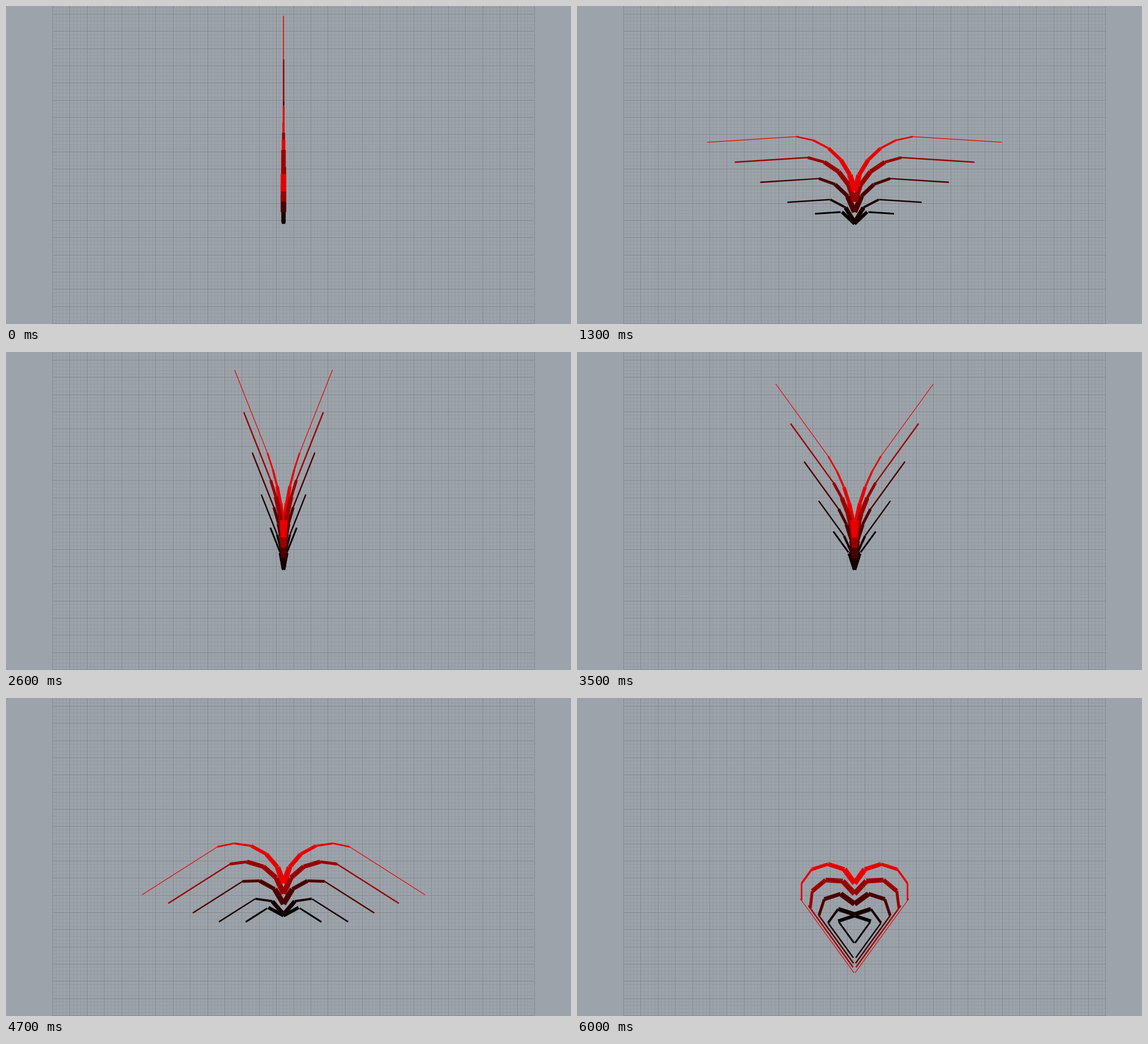
An HTML page with a canvas that plays this animation: 998 by 561 pixels, repeating every 6.1 s.

```html
<!DOCTYPE html>
<html lang="en">
<head>
<meta charset="utf-8">
<title>Unfolding heart</title>
<style>
  html, body { margin: 0; width: 100%; height: 100%; overflow: hidden; background: #9da3aa; }
  canvas { display: block; }
</style>
</head>
<body>
<canvas id="stage" width="998" height="561"></canvas>
<script>
const W = 998, H = 561;
const STEP_MS = 100, STEPS = 61;
const TURN = 7.2 * Math.PI / 180;   // turn of the outermost link per step
const CENTER_X = 490.25, LINK = 30.4;

const ctx = document.getElementById("stage").getContext("2d");

// widths: one per short link, then the long tip; the tip spans from..to along its direction
const chains = [
  { color: "#000000", y: 384.2, widths: [6, 3],                  from: 2.3,  to: 47.7 },
  { color: "#180000", y: 381.6, widths: [7.5, 4, 2.4],           from: 0.5,  to: 76 },
  { color: "#4a0000", y: 363.4, widths: [9.5, 7, 5, 2.45],       from: -0.5, to: 104 },
  { color: "#990000", y: 345.2, widths: [9.5, 8.5, 7.6, 5, 2.4], from: -5.5, to: 129 },
  { color: "#e80000", y: 327,   widths: [9.5, 7.5, 6, 3.6, 2.8, 1.2], from: -4.5, to: 157.6 }
];

const grid = document.createElement("canvas");
grid.width = W;
grid.height = H;

function drawGrid() {
  const g = grid.getContext("2d");
  const left = 82.6, right = 934;
  const cols = 28, unitX = 30.39, top = 14.4, unitY = 30.34;
  g.fillStyle = "#9da3aa";
  g.fillRect(0, 0, W, H);

  const lines = (isMajor, color) => {
    g.fillStyle = color;
    for (let i = 0; i <= cols * 5; i++) {
      if ((i % 5 === 0) === isMajor) g.fillRect(Math.floor(left + i * unitX / 5), 0, 1, H);
    }
    for (let i = -2; i <= 90; i++) {
      if ((i % 5 === 0) === isMajor) g.fillRect(82, Math.floor(top + i * unitY / 5), right - 82, 1);
    }
  };
  lines(false, "rgba(132,136,143,0.32)");
  lines(true, "#85878e");
}

// Rises to 14, falls back to 0, then rises to 30.
function poseAt(step) {
  if (step < 15) return step;
  if (step < 30) return 29 - step;
  return step - 30;
}

function linksOf({ color, y, widths, from, to }, pose) {
  const count = widths.length;
  let px = 0, py = y;
  return widths.map((width, i) => {
    const angle = pose * TURN * (i + 1) / count;
    const dx = Math.sin(angle), dy = -Math.cos(angle);
    const isTip = i === count - 1;
    const a = isTip ? from : 0, b = isTip ? to : LINK;
    const link = {
      color, width,
      x1: px + dx * a, y1: py + dy * a,
      x2: px + dx * b, y2: py + dy * b
    };
    px = link.x2;
    py = link.y2;
    return link;
  });
}

function drawLink({ color, width, x1, y1, x2, y2 }) {
  ctx.strokeStyle = color;
  ctx.lineWidth = width;
  for (const side of [-1, 1]) {
    ctx.beginPath();
    ctx.moveTo(CENTER_X + side * x1, y1);
    ctx.lineTo(CENTER_X + side * x2, y2);
    ctx.stroke();
  }
}

function draw(now) {
  const step = Math.floor(now / STEP_MS) % STEPS;
  const pose = poseAt(step);
  ctx.drawImage(grid, 0, 0);
  // Thicker links lie in front of thinner ones.
  chains.flatMap(chain => linksOf(chain, pose))
    .sort((a, b) => a.width - b.width)
    .forEach(drawLink);
}

let start;
function tick(now) {
  start ??= now;
  draw(now - start);
  requestAnimationFrame(tick);
}

drawGrid();
draw(0);
requestAnimationFrame(tick);
</script>
</body>
</html>
```
